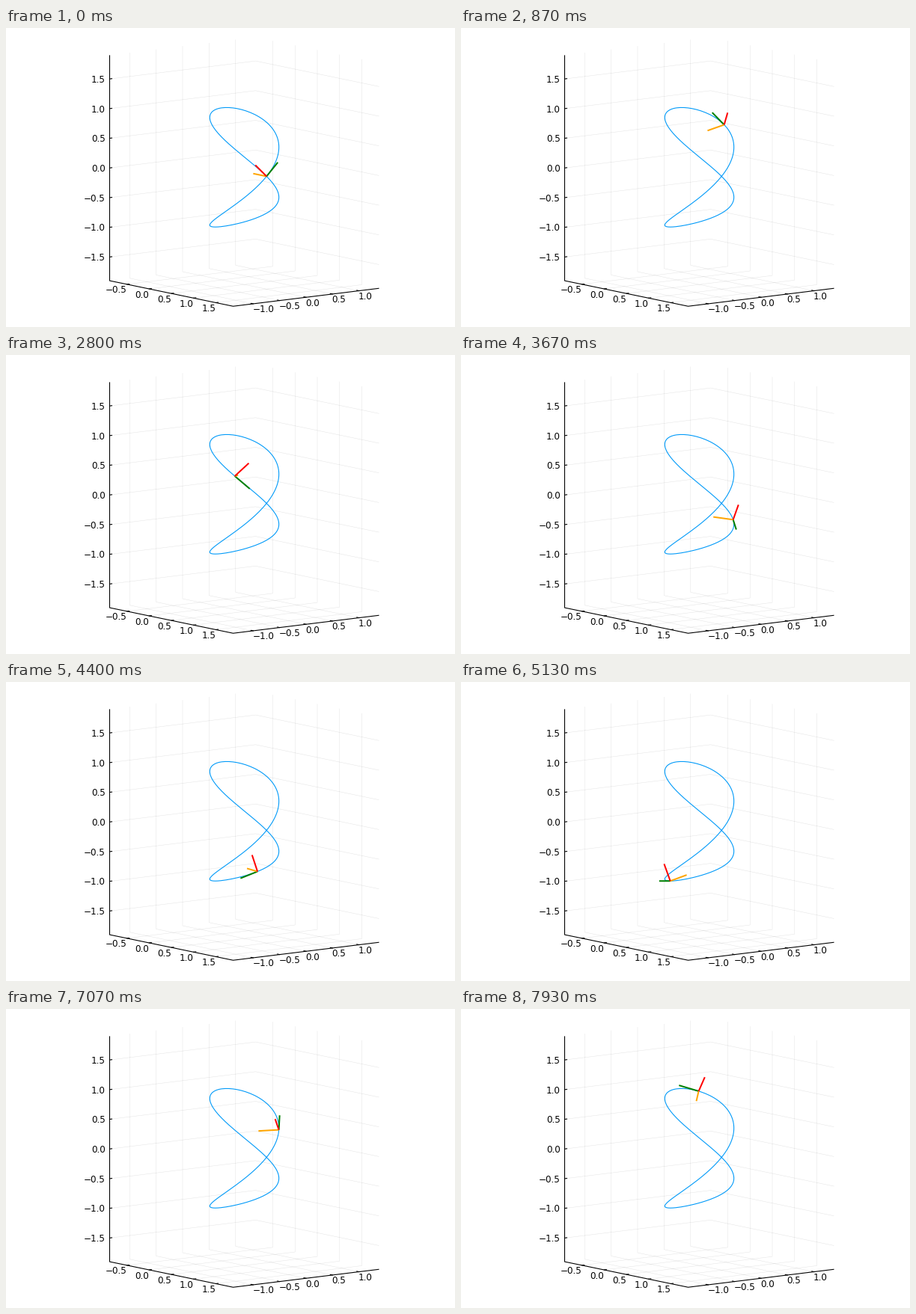
A matplotlib script that plays this animation: 600 px wide and 400 px high, repeating every 8 s.

```python
import numpy as np
import matplotlib.pyplot as plt
from matplotlib.animation import FuncAnimation

W, H, DPI = 600, 400, 100
LOOP_MS, TICK_MS = 8000, 20
POSES, LEAD_MS = 120, 15
STEP = 4 * np.pi / 199
ARM = 0.3

# Parallel projection: pixel vector of one unit along each axis
CENTER = np.array([318.5, 192.3])
MID = np.array([0.5, 0.0, 0.0])
AXES = np.array([[59.4, 12.3], [70.7, -8.7], [0.0, -79.4]])
LOW = np.array([-0.889, -1.379, -1.9])
HIGH = np.array([1.889, 1.379, 1.9])
X_TICKS = [-0.5, 0.0, 0.5, 1.0, 1.5]
Y_TICKS = [-1.0, -0.5, 0.0, 0.5, 1.0]
Z_TICKS = [-1.5, -1.0, -0.5, 0.0, 0.5, 1.0, 1.5]


def px(points):
    return CENTER + (np.asarray(points, float) - MID) @ AXES


def pt(pixels):
    return pixels * 72 / DPI


def viviani(t):
    return np.stack([np.cos(t) ** 2, np.sin(t) * np.cos(t), np.sin(t)], axis=-1)


def unit(v):
    return v / np.linalg.norm(v)


def frenet(t):
    d1 = np.array([-np.sin(2 * t), np.cos(2 * t), np.cos(t)])
    d2 = np.array([-2 * np.cos(2 * t), -2 * np.sin(2 * t), -np.sin(t)])
    tangent = unit(d1)
    binormal = unit(np.cross(d1, d2))
    return tangent, np.cross(binormal, tangent), binormal


fig = plt.figure(figsize=(W / DPI, H / DPI), dpi=DPI, facecolor="white")
ax = fig.add_axes([0, 0, 1, 1])
ax.set_xlim(0, W)
ax.set_ylim(H, 0)
ax.axis("off")


def path(points, color, width, **kw):
    p = px(points)
    return ax.plot(p[:, 0], p[:, 1], color=color, lw=pt(width),
                   solid_capstyle="butt", **kw)[0]


def grid(*points):
    path(points, "black", 0.55, alpha=0.1)


def tick(point, inward, length=3):
    """Short mark running from an axis into the box."""
    start = px(point)
    end = start + length * unit(inward @ AXES)
    ax.plot([start[0], end[0]], [start[1], end[1]], color="black", lw=pt(1.1))
    return start


def label(pos, value, align):
    text = f"{value:.1f}".replace("-", "\u2212")
    ax.text(pos[0], pos[1], text, ha=align, va="center_baseline",
            family="DejaVu Sans", fontsize=pt(12.0))


x0, y0, z0 = LOW
x1, y1, z1 = HIGH

for x in X_TICKS:
    grid((x, y0, z0), (x, y1, z0), (x, y1, z1))
for y in Y_TICKS:
    grid((x1, y, z0), (x0, y, z0), (x0, y, z1))
for z in Z_TICKS:
    grid((x0, y0, z), (x0, y1, z), (x1, y1, z))

path([(x0, y0, z1), (x0, y0, z0), (x1, y0, z0), (x1, y1, z0)], "black", 1.1)

ex, ey = np.eye(3)[:2]
for x in X_TICKS:
    label(tick((x, y0, z0), ey) + (0, 6.5), x, "right")
for y in Y_TICKS:
    label(tick((x1, y, z0), -ex) + (-1, 6.5), y, "left")
for z in Z_TICKS:
    label(tick((x0, y0, z), ey) + (-5.5, -0.3), z, "right")

path(viviani(np.linspace(0, 2 * np.pi, 200)), "#009AF9", 1.1)
arms = [path(np.zeros((2, 3)), c, 2) for c in ("green", "orange", "red")]


def update(i):
    # Poses change 15 times a second, on a finer clock
    pose = (i * TICK_MS + LEAD_MS) * POSES // LOOP_MS
    t = pose * STEP
    origin = viviani(t)
    for arm, direction in zip(arms, frenet(t)):
        arm.set_data(*px([origin, origin + ARM * direction]).T)
    return arms


anim = FuncAnimation(fig, update, frames=LOOP_MS // TICK_MS, interval=TICK_MS,
                     repeat=True, repeat_delay=0)
plt.show()
```
